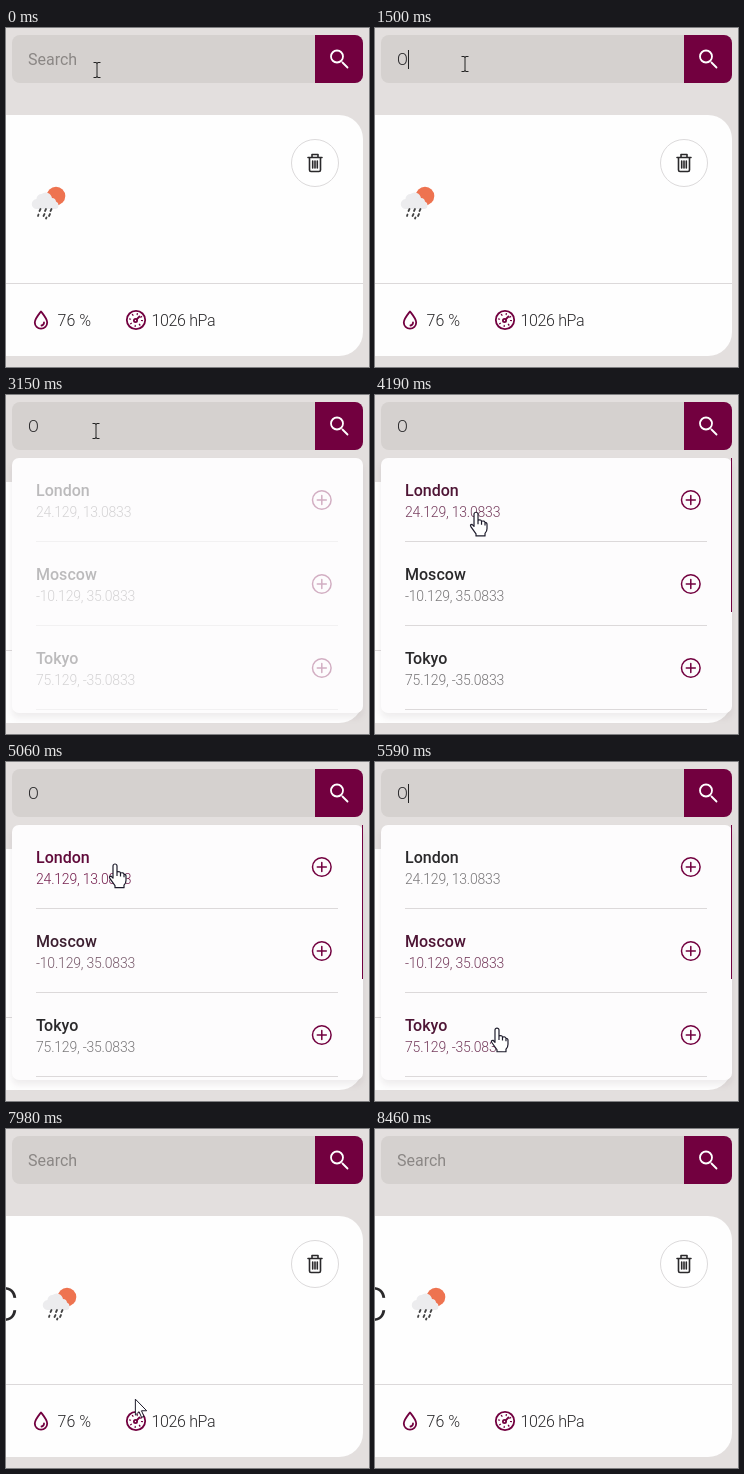
Animation of 363 by 339 pixels, one loop 8.85 s. Source, as an HTML page:

```html
<!DOCTYPE html>
<html lang="en">
<head>
<meta charset="utf-8">
<title>City search</title>
<style>
  html, body { margin: 0; width: 100%; height: 100%; overflow: hidden; background: #e3dfde; }
  svg { display: block; font: 400 16px Roboto, sans-serif; fill: #2a292b; }
  .line { fill: none; stroke: #72003f; stroke-width: 1.8; stroke-linecap: round; stroke-linejoin: round; }
  .rule { stroke: #dcd9da; }
  .light { font-weight: 300; }
  .shadow { filter: drop-shadow(0 5px 3px rgba(40, 20, 30, .07)); }
  .name { font-weight: 500; }
  .coords { font-size: 14px; letter-spacing: -.2px; }
</style>
</head>
<body>
<svg width="363" height="339" viewBox="0 0 363 339">
  <rect x="-30" y="87" width="387" height="241" rx="24" fill="#fefefe"/>
  <path class="rule" d="M0 255.5H357"/>
  <text id="degrees" class="light" x="13" y="192" font-size="48" text-anchor="end">°C</text>

  <g id="weather">
    <circle cx="50" cy="168" r="9.3" fill="#ee7350"/>
    <path fill="#ececee" d="M31 181a5 5 0 0 1-.5-10 5 5 0 0 1 5-5 6.500 6.500 0 0 1 10.500 4 4 4 0 0 1 4 3.500 4 4 0 0 1 0 7.500z"/>
    <path stroke="#444" stroke-width="1.8" stroke-linecap="round" d="M34.500 181l-1 2M40 181l-1 2M45.500 181l-1 2M32.500 186.500l-.5 1.500M38.500 186l-1 2M44 186l-1 2M40.500 189.500l-.5 1"/>
  </g>

  <circle cx="309" cy="135" r="23.500" fill="#fff" stroke="#dcdadb"/>
  <path class="line" style="stroke:#2a292b;stroke-width:1.600" d="M302 129.500h14M306 129v-2.500h6v2.500M303.500 130v12q0 1.500 1.500 1.500h8q1.500 0 1.500-1.500v-12M306.700 133v7M309 133v7M311.300 133v7"/>

  <path class="line" d="M35 283.500C31.500 288 28.800 291 28.800 294.500a6.200 6.200 0 0 0 12.400 0C41.200 291 38.500 288 35 283.500zM38 294.500q0 2.500-2.500 3"/>
  <text class="light" x="51.500" y="298">76 %</text>
  <g class="line">
    <circle cx="130" cy="292" r="9.200"/>
    <circle cx="130" cy="292" r="6" stroke-width="2" stroke-dasharray="1.200 3.510" stroke-linecap="butt"/>
    <circle cx="129.500" cy="292.500" r="1.600"/>
    <path d="M131 291l2.500-2.500"/>
  </g>
  <text class="light" x="145.500" y="298" letter-spacing="-.35">1026 hPa</text>

  <rect x="6" y="7" width="351" height="48" rx="8" fill="#d5d1cf"/>
  <path fill="#72003f" d="M309 7h40a8 8 0 0 1 8 8v32a8 8 0 0 1-8 8h-40z"/>
  <path class="line" style="stroke:#fff" d="M336.500 34.500l5 5M325 28.500a6 6 0 1 0 12 0 6 6 0 1 0-12 0"/>
  <text id="input" x="22" y="37"></text>
  <path id="caret" stroke="#222" d="M0 22v19"/>

  <g id="panel">
    <rect id="sheet" class="shadow" x="6" y="63" width="351" rx="7" fill="#fdfcfd"/>
    <circle id="spinner" class="line" style="stroke-width:2.600;stroke-linecap:butt" cx="181.500" cy="105.500" r="11" stroke-dasharray="54 15.115"/>
    <g id="results"></g>
    <path id="thumb" stroke="#72003f" d="M356.500 63V217"/>
  </g>

  <g id="cursor" stroke-linejoin="round">
    <path id="beam" fill="none" stroke="#222" d="M-3.500-7.500H-1Q0-7.500 0-6.500Q0-7.500 1-7.500H3.500M0-7V7M-3.500 7.500H-1Q0 7.500 0 6.500Q0 7.500 1 7.500H3.500"/>
    <path id="hand" fill="#fff" stroke="#1d1b2b" stroke-width="1.200" d="M-2 2a2 2 0 0 1 4 0v6q3-1 3.500 1q3-.8 3.500 1.200q2 0 2 2v4q0 3-2 5v2.500h-9v-2l-5-7q-1.500-2.500 1-2.500l2 2zM2 8v4M5.500 9v3.500M9 10.200v3"/>
    <path id="arrow" fill="#fff" stroke="#1d1b2b" d="M-2 0v16l3.700-3.500 2.500 5.700 2.400-1-2.500-5.600h5.200z"/>
  </g>
</svg>
<script>
const LOOP = 8850, TYPED = 1500, OPEN = 2270, LOADED = 3090, CLOSE = 7110;
const $ = id => document.getElementById(id);
const clamp = v => Math.min(1, Math.max(0, v));
const show = (id, on) => $(id).style.display = on ? '' : 'none';

const cities = [['London', '24.129, 13.0833'], ['Moscow', '-10.129, 35.0833'], ['Tokyo', '75.129, -35.0833']];
$('results').innerHTML = cities.map(([name, coords], i) => `
  <g transform="translate(0 ${i * 84})">
    <text class="name" x="30" y="101">${name}</text>
    <text class="coords light" x="30" y="122">${coords}</text>
    <path class="line" style="stroke-width:1.5" d="M306.500 105a9.300 9.300 0 1 0 18.600 0a9.300 9.300 0 1 0-18.600 0M311.300 105h9M315.800 100.500v9"/>
    <path class="rule" d="M30 146.500H332"/>
  </g>`).join('');
const rows = [...$('results').children];

// Pointer hotspot: [time, x, y]
const path = [
  [0, 91, 42], [190, 91, 42], [240, 91, 38], [460, 91, 38], [540, 90, 36],
  [3940, 90, 36], [4080, 95, 55], [4190, 101, 117], [4570, 107, 205],
  [4730, 107, 205], [5060, 109, 102], [5150, 109, 102], [5590, 122, 266],
  [5730, 121, 272], [6300, 121, 272], [6390, 121, 267], [7960, 121, 267],
  [8460, 368, 342], [LOOP, 368, 342]
];
function pointer(t) {
  const i = Math.max(1, path.findIndex(p => p[0] >= t));
  const [a, b] = [path[i - 1], path[i]];
  const u = clamp((t - a[0]) / (b[0] - a[0]));
  return [a[1] + (b[1] - a[1]) * u, a[2] + (b[2] - a[2]) * u];
}

// Averaging recent hover states gives a 200 ms linear colour transition.
function hover(row, t) {
  let hits = 0;
  for (let k = 0; k < 20; k++) {
    const y = pointer(Math.max(0, t - k * 10))[1];
    if (y >= 63 && Math.floor((y - 63) / 84) === row) hits++;
  }
  return hits / 20;
}
const mix = (a, b, u) => `rgb(${a.map((v, i) => v + (b[i] - v) * u)})`;
const MAROON = [114, 0, 63];

function draw(t) {
  const typed = t >= TYPED && t < CLOSE, closed = t >= CLOSE;
  $('input').textContent = typed ? 'O' : 'Search';
  $('input').setAttribute('fill', typed ? '#2a292b' : '#8b8785');
  $('input').setAttribute('font-weight', typed ? 300 : 400);

  const blink = typed ? Math.floor((t - TYPED) / 491) % 2 === 0 : t >= 500 && t < 1070;
  show('caret', blink && !closed);
  $('caret').setAttribute('transform', `translate(${typed ? 33.5 : 22.5} 0)`);

  show('degrees', closed);
  $('weather').setAttribute('transform', `translate(${closed ? 11 : 0} 0)`);

  const open = clamp((t - OPEN) / 300), loaded = t >= LOADED;
  show('panel', t >= OPEN && !closed);
  $('panel').setAttribute('opacity', open);
  $('panel').setAttribute('transform', `translate(0 ${-10 * (1 - open)})`);
  $('sheet').setAttribute('height', loaded ? 255 : 85);
  show('spinner', !loaded);
  $('spinner').setAttribute('transform', `rotate(${(t - OPEN) * .36 - 61} 181.5 105.5)`);
  show('results', loaded);
  $('results').setAttribute('opacity', clamp((t - LOADED) / 200));

  const [x, y] = pointer(t);
  const inList = y >= 63 && !closed;
  show('thumb', inList);
  rows.forEach((row, i) => {
    const u = hover(i, t);
    row.children[0].setAttribute('fill', mix([42, 41, 43], MAROON, u));
    row.children[1].setAttribute('fill', mix([120, 118, 120], MAROON, u));
  });

  show('beam', y < 63);
  show('hand', inList);
  show('arrow', closed);
  $('cursor').setAttribute('transform', `translate(${x} ${y})`);
}

const start = performance.now();
function tick() {
  draw((performance.now() - start) % LOOP);
  requestAnimationFrame(tick);
}
tick();
</script>
</body>
</html>
```
